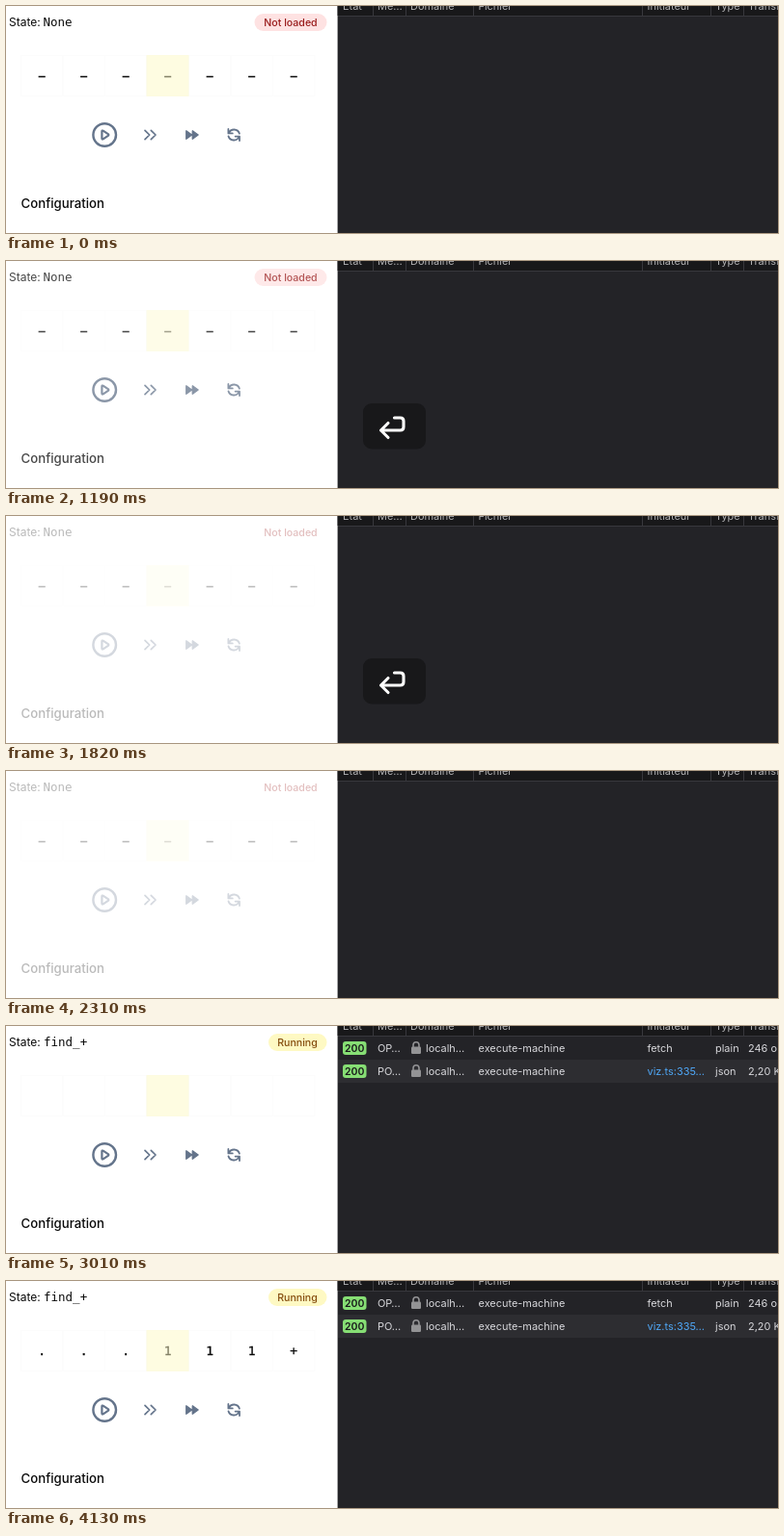
Recreate the animation shown at these times as an HTML page. Size 800x236 px, loop 4200 ms.

```html
<!DOCTYPE html>
<html lang="en">
<head>
<meta charset="utf-8">
<title>Machine run</title>
<style>
  html, body { margin: 0; width: 100%; height: 100%; overflow: hidden; background: #fff; }
  svg { display: block; width: 800px; height: 236px; }
  text { font: 10.95px Inter, sans-serif; fill: #0a0a0a; }
  .label { font-size: 12px; }
  .title { font-size: 13.2px; font-weight: 500; }
  .mono { font: 12.5px "DejaVu Sans Mono", monospace; }
  .symbol { font: 13px "DejaVu Sans Mono", monospace; text-anchor: middle; stroke: #0a0a0a; stroke-width: .3; }
  .dash { font-size: 10.5px; stroke-width: .8; }
  .pill { font-size: 10.6px; font-weight: 500; text-anchor: middle; }
  .line { fill: none; stroke: #64748b; stroke-linecap: round; stroke-linejoin: round; }
  .head { fill: #b1b1b3; }
  .cell { fill: #d7d7db; }
  .link { fill: #4fa8f8; }
  .code { font-weight: 600; font-size: 10.5px; text-anchor: middle; fill: #18181a; }
</style>
</head>
<body>
<svg viewBox="0 0 800 236">
  <rect width="344" height="236" fill="#fff"/>
  <g id="panel">
    <text class="label" x="3" y="21">State:</text>
    <g id="idle">
      <text class="mono" x="38.5" y="21">None</text>
      <rect id="badge" x="257.5" y="8" width="75" height="18" rx="9" fill="#fee2e2"/>
      <text class="pill" x="295" y="20.8" style="fill:#991b1b">Not loaded</text>
    </g>
    <g id="running">
      <text class="mono" x="39" y="21">find_+</text>
      <rect x="272" y="8" width="60.5" height="18" rx="9" fill="#fef9c3"/>
      <text class="pill" x="302" y="20.8" style="fill:#854d0e">Running</text>
    </g>

    <g id="cells" fill="none" stroke="#fcfcfc"></g>
    <g id="blank"></g>
    <g id="tape"></g>
    <rect x="145.5" y="51" width="44" height="43" fill="#fef9c3" opacity=".5"/>

    <g class="line">
      <circle cx="102.2" cy="134" r="11.8" stroke-width="2.4"/>
      <path d="M99.4 130.4v7.2q0 1.3 1.2 .7l5.2-3.4q1.1-.9 0-1.8l-5.2-3.4q-1.2-.6-1.2 .7z" stroke-width="2.2"/>
      <path d="M144 129.3l4.7 4.7-4.7 4.7M150.3 129.3l4.7 4.7-4.7 4.7" stroke-width="1.7"/>
      <path d="M186.8 129.8v8.4l5.8-4.2zM193.3 129.8v8.4l5.8-4.2z" fill="#64748b" stroke-width="1.4"/>
      <g stroke-width="1.8">
        <path id="arc" d="M230.4 128v4.4h4.4M230.9 132a5.9 5.9 0 0 1 11 .6"/>
        <use href="#arc" transform="rotate(180 236.2 134)"/>
      </g>
    </g>
    <text class="title" x="15.6" y="210">Configuration</text>
  </g>

  <rect x="343.6" width="456.4" height="236" fill="#232327"/>
  <rect x="343.6" width="456.4" height="10" fill="#18181a"/>
  <rect x="344" y="10" width="456" height="1" fill="#38383d"/>
  <g id="header"></g>
  <g id="rows"></g>
  <g id="key">
    <rect x="370" y="148" width="65" height="47.5" rx="9" fill="#18181a"/>
    <path d="M402.5 163h6q3.5 0 3.5 3.5v6q0 3.5-3.5 3.5H388.5M396 168.5l-7.5 7.5 7.5 7.5"
      fill="none" stroke="#fff" stroke-width="3.1" stroke-linecap="round" stroke-linejoin="round"/>
  </g>
</svg>
<script>
const LOOP = 4200, TICK = 70;
const byId = id => document.getElementById(id);
const put = (id, markup) => byId(id).insertAdjacentHTML('beforeend', markup);
const label = (cls, x, y, text) => `<text class="${cls}" x="${x}" y="${y}">${text}</text>`;

// Tape
const PITCH = 43.5, FIRST = 37.2;
const symbols = (id, chars, cls, base) => [...chars].forEach((char, i) =>
  put(id, label(cls, FIRST + i * PITCH, base, char)));
for (let i = 0; i < 7; i++)
  put('cells', `<rect x="${FIRST + (i - .5) * PITCH}" y="51.5" width="${PITCH}" height="42"/>`);
symbols('blank', '–––––––', 'symbol dash', 76.2);
symbols('tape', '...111+', 'symbol', 77);

// Network table
const columns = [349, 385, 419, 489.5, 664.5, 735, 769];
['État', 'Me…', 'Domaine', 'Fichier', 'Initiateur', 'Type', 'Transfert'].forEach((name, i) => {
  put('header', label('head', columns[i], 4, name));
  if (i) put('header', `<rect x="${Math.floor(columns[i]) - 5}" width="1" height="10" fill="#38383d"/>`);
});

function addRow(top, fill, [method, domain, file, initiator, type, size], linked) {
  const base = top + 15.8;
  const cells = [[385, method], [435, domain], [489.5, file],
    [664.5, initiator, linked && 'link'], [735, type], [769, size]];
  put('rows', `<rect x="344" y="${top}" width="456" height="24" fill="${fill}"/>
    <rect x="349" y="${top + 5}" width="24.5" height="14" rx="3" fill="#86de74"/>
    ${label('code', 361.2, base, '200')}
    <path d="M422 ${top + 11}v-2.2a3 3 0 0 1 6 0v2.2" fill="none" stroke="#939395" stroke-width="1.6"/>
    <rect x="420" y="${top + 10.5}" width="10" height="7.5" rx="1.2" fill="#939395"/>
    ${cells.map(([x, text, cls]) => label(cls || 'cell', x, base, text)).join('')}`);
}
addRow(11, '#232327', ['OP…', 'localh…', 'execute-machine', 'fetch', 'plain', '246 o']);
addRow(35, '#2d2d31', ['PO…', 'localh…', 'execute-machine', 'viz.ts:335…', 'json', '2,20 K'], true);

// Opacity steps: [time in ms, value]
const REPLY = 2730;
const appear = at => [[0, 0], [at - 2, 0], [at - 1, 1], [LOOP, 1]];
const tracks = {
  panel: [[0, 1], [980, 1], [1190, .75], [1470, .38], [1610, .28], [REPLY, .28], [2870, .52], [3010, 1], [LOOP, 1]],
  badge: [[0, 1], [1190, 1], [1610, 0], [LOOP, 0]],
  idle: [[0, 1], [REPLY - 2, 1], [REPLY - 1, 0], [LOOP, 0]],
  running: appear(REPLY),
  rows: appear(REPLY),
  blank: [[0, 1], [2870, 1], [3010, 0], [LOOP, 0]],
  tape: [[0, 0], [3080, 0], [3360, 1], [LOOP, 1]],
  key: [[0, 0], [840, 0], [980, 1], [2100, 1], [2310, 0], [LOOP, 0]],
};
for (const [id, steps] of Object.entries(tracks))
  byId(id).animate(
    steps.map(([time, opacity]) => ({ offset: time / LOOP, opacity })),
    { duration: LOOP, iterations: Infinity, easing: `steps(${LOOP / TICK})` });
</script>
</body>
</html>
```
